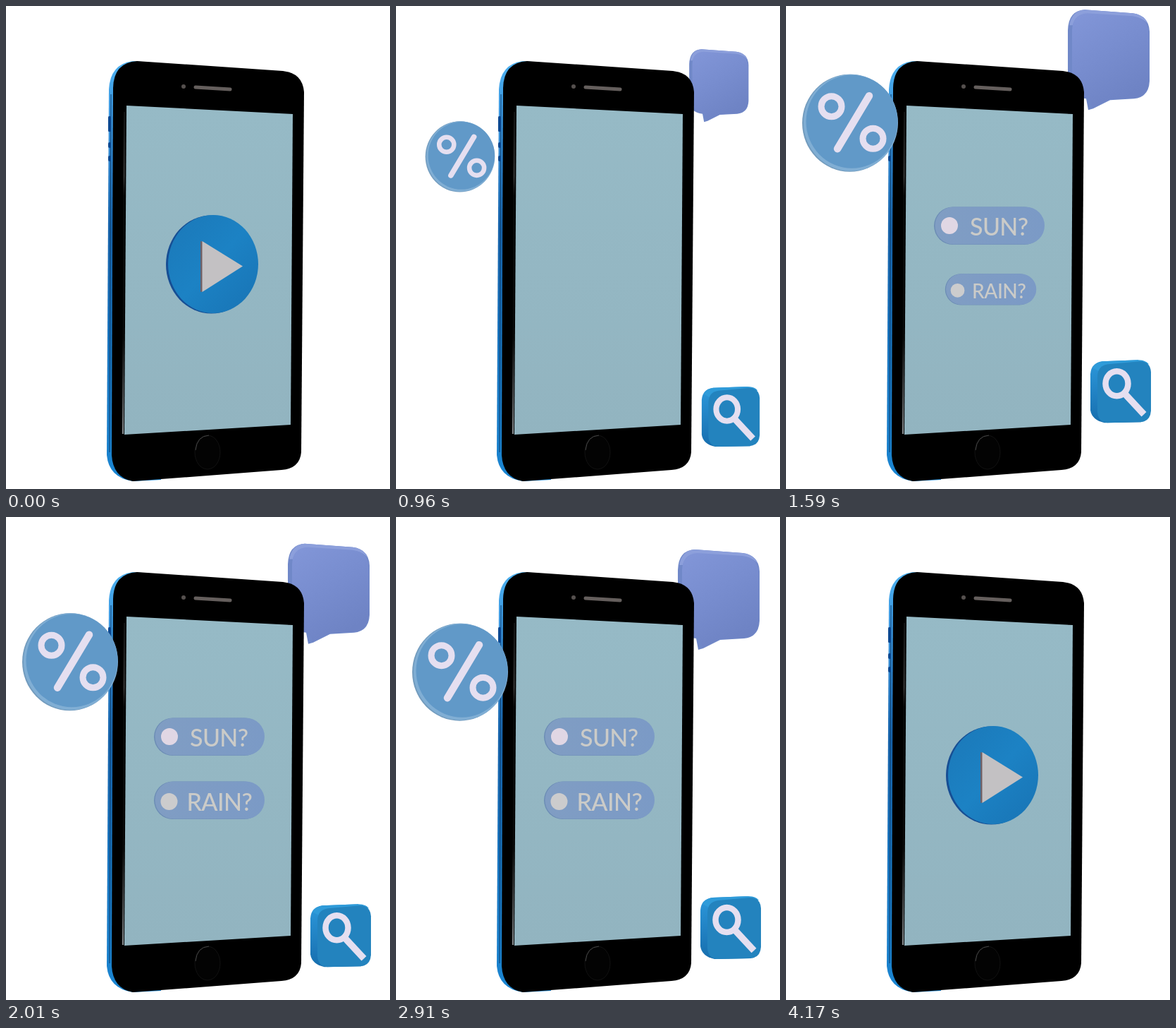
An HTML page that plays this animation: 545x684 px, repeating every 4.2 s.

```html
<!DOCTYPE html>
<html lang="en">
<head>
<meta charset="utf-8">
<title>Phone</title>
<style>
html, body { margin: 0; width: 100%; height: 100%; overflow: hidden; background: #fff; }
svg { display: block; width: 545px; height: 684px; }
text { font: 500 34px Lato, "Open Sans", sans-serif; letter-spacing: -.6px; fill: #cbcbc8; }
.mark { fill: none; stroke: #e5dff0; }
</style>
</head>
<body>
<svg viewBox="0 0 545 684">
  <defs>
    <linearGradient id="side" x2="0" y2="1">
      <stop offset="0" stop-color="#4db1f0"/><stop offset=".12" stop-color="#3c97df"/>
      <stop offset=".4" stop-color="#1663ab"/><stop offset="1" stop-color="#1b86d2"/>
    </linearGradient>
    <linearGradient id="screen" x2="0" y2="1">
      <stop offset="0" stop-color="#96bac6"/><stop offset="1" stop-color="#92b4c0"/>
    </linearGradient>
    <linearGradient id="glint" x2="0" y2="1">
      <stop offset="0" stop-color="#111"/><stop offset=".2" stop-color="#3a3a3a"/>
      <stop offset=".26" stop-color="#0a0a0a"/><stop offset=".7" stop-color="#0a0a0a"/>
      <stop offset="1" stop-color="#8a8f92"/>
    </linearGradient>
    <linearGradient id="disc" x2="1" y2="1">
      <stop offset="0" stop-color="#1b78b8"/><stop offset=".5" stop-color="#1c82c4"/><stop offset="1" stop-color="#1873b4"/>
    </linearGradient>
    <linearGradient id="talk" x2=".5" y2="1">
      <stop offset="0" stop-color="#8296d8"/><stop offset=".5" stop-color="#788dcf"/><stop offset="1" stop-color="#6e83c4"/>
    </linearGradient>
    <linearGradient id="pill" x2="1" y2="0">
      <stop offset="0" stop-color="#809dc3"/><stop offset="1" stop-color="#7b9ac6"/>
    </linearGradient>
    <linearGradient id="edge" x2="0" y2="1">
      <stop offset="0" stop-color="#2c98db"/><stop offset="1" stop-color="#176eae"/>
    </linearGradient>
  </defs>

  <g id="bubble">
    <path fill="#7088c8" d="M400 34Q401 6 424 5L492 10Q515 13 516 36V106Q515 129 494 131L460 133L436 145L429 147L426 131Q401 128 400 106Z"/>
    <path fill="#8c9fdb" d="M402 27Q406 6 424 5L492 10Q509 12 514 26Q507 16 492 15L427 11Q411 11 407 27Z"/>
    <path fill="url(#talk)" d="M406 34Q407 11 428 10L492 14Q514 17 515 38V106Q514 128 494 130L459 132L435 144L430 130Q407 127 406 105Z"/>
  </g>

  <g id="phone">
    <path fill="url(#side)" d="M146 118Q148 82 180 78L220 81V671L180 673Q146 668 143 636Z"/>
    <path fill="#000" d="M152 116Q153 80 186 78L393 92Q421 95 423 122L419 632Q417 655 391 657L180 673Q152 668 150 636Z"/>
    <path fill="none" stroke="#0c3f70" d="M149 125L147 632"/>
    <g fill="#0b4790">
      <rect x="145" y="156" width="4" height="22" rx="1.5"/>
      <rect x="145" y="193" width="4" height="8" rx="2"/>
      <rect x="145" y="212" width="4" height="8" rx="2"/>
    </g>
    <path fill="url(#glint)" d="M167 150H169L167 606H165Z"/>
    <path fill="url(#screen)" d="M171 141L407 153L404 593L168 607Z"/>
    <circle cx="252" cy="114" r="3" fill="#55504e"/>
    <path stroke="#655f5d" stroke-width="5" stroke-linecap="round" d="M269 115L318 118"/>
    <ellipse cx="286" cy="632" rx="18" ry="24" fill="#030303" stroke="#121212"/>
    <path fill="none" stroke="#444" d="M269 629Q271 609 288 608"/>
  </g>

  <g id="play">
    <ellipse cx="291.500" cy="366" rx="64.500" ry="69.500" fill="#164e94"/>
    <ellipse cx="294" cy="365.500" rx="64" ry="69.500" fill="url(#disc)"/>
    <path fill="#6e6168" d="M276 333L280 334V404L276 405Z"/>
    <path fill="#c3c1c3" d="M278.500 333L336 368.500L278.500 405Z"/>
  </g>

  <g id="sun">
    <rect x="210" y="284.500" width="155" height="53.500" rx="26.700" fill="#6c8db5"/>
    <rect x="211.500" y="284.500" width="155.500" height="53" rx="26.500" fill="url(#pill)"/>
    <circle cx="232" cy="311" r="12" fill="#e1d7e4"/>
    <text x="261" y="325">SUN?</text>
  </g>
  <g id="rain">
    <rect x="210" y="374.500" width="155" height="53.500" rx="26.700" fill="#6c8db5"/>
    <rect x="211.500" y="374.500" width="155.500" height="53" rx="26.500" fill="url(#pill)"/>
    <circle cx="231.500" cy="403" r="12" fill="#cccccd"/>
    <text x="256.500" y="416">RAIN?</text>
  </g>

  <g id="percent">
    <ellipse cx="90.500" cy="165.500" rx="67.500" ry="69" fill="#739cbe"/>
    <ellipse cx="92" cy="165" rx="67" ry="68.500" fill="#80aed4"/>
    <ellipse cx="93.500" cy="163.500" rx="65" ry="66" fill="#6199c8"/>
    <g class="mark" stroke-width="9">
      <circle cx="64.500" cy="142" r="14.500"/>
      <circle cx="123.500" cy="187.500" r="14.500"/>
      <path stroke-width="10.500" stroke-linecap="round" d="M118 127L73 202"/>
    </g>
  </g>

  <g id="search">
    <path fill="url(#edge)" d="M432 521Q433 505 449 503L500 501L504 589L452 590Q434 586 432 572Z"/>
    <path fill="#2f9bd9" d="M435 512Q440 504 449 503L500 501Q511 501 515 507L455 512L444 517Z"/>
    <path fill="#2383be" d="M442 525Q442 509 457 507L502 503Q517 503 518 518V573Q517 588 503 589L456 590Q443 589 442 575Z"/>
    <g class="mark">
      <ellipse cx="469.500" cy="534.500" rx="16" ry="17.500" stroke-width="8.500"/>
      <path stroke-width="9.500" d="M481 549L508 578"/>
    </g>
  </g>
</svg>
<script>
const LOOP = 4200, STEP = 30;

// Eased value through [time, value] keys
function track(t, keys) {
  if (t <= keys[0][0]) return keys[0][1];
  for (let i = 1; i < keys.length; i++) {
    const [a, from] = keys[i - 1], [b, to] = keys[i];
    if (t < b) {
      const u = (t - a) / (b - a);
      return from + (to - from) * u * u * (3 - 2 * u);
    }
  }
  return keys[keys.length - 1][1];
}

const visible = (a, b, c, d) => [[a, 0], [b, 1], [c, 1], [d, 0]];
const still = [[0, 0]];

// Pivot, scale keys and vertical offset keys
const parts = {
  play: [293, 365, [[0, 1], [555, 0], [3870, 0], [4170, 1]], still],
  bubble: [459, 75, visible(560, 1170, 2940, 3240),
    [[960, 37], [1560, 0], [2550, 76], [3000, 37]]],
  percent: [91, 165, visible(560, 1170, 2940, 3240),
    [[960, 48], [1560, 0], [2590, 98], [3000, 48]]],
  search: [475, 546, visible(540, 1020, 2940, 3240),
    [[960, 36], [1560, 0], [2340, 77], [2880, 36]]],
  sun: [300, 311, visible(960, 1560, 3330, 3630), still],
  rain: [300, 402, visible(1150, 1750, 3120, 3420), still]
};

function draw(now) {
  const t = Math.floor(now % LOOP / STEP) * STEP;
  for (const [id, [x, y, size, shift]] of Object.entries(parts)) {
    const s = track(t, size), dy = track(t, shift);
    document.getElementById(id).setAttribute("transform",
      `translate(${x} ${y + dy}) scale(${s}) translate(${-x} ${-y})`);
  }
}

const start = performance.now();
function frame() {
  draw(performance.now() - start);
  requestAnimationFrame(frame);
}
frame();
</script>
</body>
</html>
```
